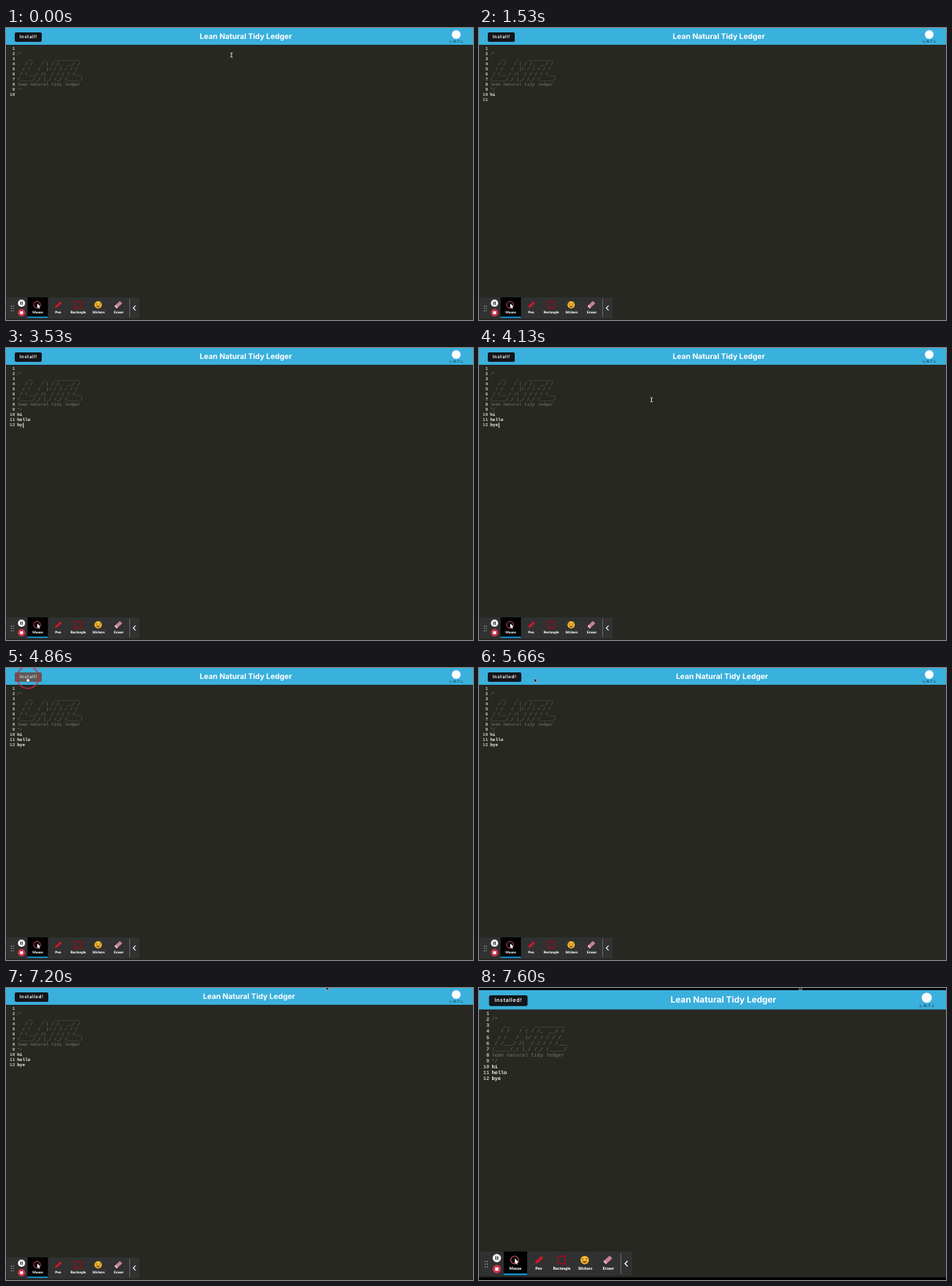
An HTML page for the animation above (8 s loop, 640 px wide and 400 px high).

```html
<!DOCTYPE html>
<html lang="en">
<head>
<meta charset="utf-8">
<title>Text editor demo</title>
<style>
  html, body { margin: 0; width: 100%; height: 100%; overflow: hidden; background: #000; }
  #stage { position: relative; width: 640px; height: 400px; overflow: hidden; background: #000; text-rendering: geometricPrecision; }

  #page { --zoom: 1; position: absolute; left: 0; top: 0; width: 640px; height: 400px; overflow: hidden; background: #272822; transform-origin: 0 0; transform: scale(var(--zoom)); }
  #page.zoomed { --zoom: 1.147; top: 3px; width: calc(640px / 1.147); height: calc(393px / 1.147); }

  header { box-sizing: border-box; position: absolute; left: 0; right: 0; top: 0; height: 23px; padding: 1px 13px 0 12px; display: flex; justify-content: space-between; align-items: center; background: #3ab0dc; font-family: Inter, sans-serif; color: #fff; }
  #install { box-sizing: border-box; height: 13px; padding: 0 6.5px; border-radius: 2px; background: #131519; font: 600 6.3px/13px Inter, sans-serif; letter-spacing: .52px; white-space: nowrap; }
  #install.hover { background: #5c5857; color: #d8d2d2; }
  h1 { margin: 0; font-size: 10.3px; line-height: 22px; font-weight: 700; white-space: nowrap; }
  .logo { position: relative; width: 19px; height: 22px; }
  .logo i { position: absolute; left: 3px; top: 2px; width: 12px; height: 12px; border-radius: 50%; background: #fff; }
  .logo b { position: absolute; left: 0; right: 0; top: 16px; text-align: center; font: 600 4.5px/6px Inter, sans-serif; letter-spacing: .35px; color: #173c4c; white-space: nowrap; }

  pre { position: absolute; top: 26.3px; margin: 0; font: 6.03px/6.95px "Liberation Mono", "Courier New", monospace; }
  #gutter { left: 0; width: 12.3px; text-align: right; color: #c8c8c4; font-weight: 700; }
  #code { left: 15.2px; color: #7d7b72; }
  #typed { color: #f8f8f2; font-weight: 700; }
  #caret { position: absolute; left: 15.7px; top: 26.3px; width: .6px; height: 6.5px; background: #f8f8f0; }

  #tools { position: absolute; left: 1px; bottom: 2px; }
  #tools text { font: 900 4.7px Lato, sans-serif; fill: #fff; text-anchor: middle; }
  #mouse { position: absolute; left: 0; top: 0; width: 640px; height: 400px; }
</style>
</head>
<body>
<div id="stage">
  <div id="page">
    <header>
      <div id="install">Install!</div>
      <h1>Lean Natural Tidy Ledger</h1>
      <div class="logo"><i></i><b>L.N.T.L</b></div>
    </header>
    <pre id="gutter"></pre>
    <pre id="code">

/*
    __    _   __________
   / /   / | / /_  __/ /
  / /   /  |/ / / / / /
 / /___/ /|  / / / / /___
/_____/_/ |_/ /_/ /_____/
lean natural tidy ledger
*/
<span id="typed"></span></pre>
    <div id="caret"></div>

    <svg id="tools" width="182" height="29" viewBox="1 369 182 29">
      <rect x="1" y="369" width="182" height="29" rx="1.5" fill="#313131"/>
      <rect x="29.5" y="369" width="28" height="28.2" fill="#000"/>
      <rect x="29.5" y="395.4" width="28" height="1.8" fill="#109ee6"/>
      <path d="M7.4 381v8M10 381v8" stroke="#b8b8b8" stroke-width="1.3" stroke-linecap="round" stroke-dasharray="0 3.2"/>
      <circle cx="21.3" cy="377" r="5" fill="#f2f2f2"/>
      <path d="M20.2 374.8v4.4M22.4 374.8v4.4" stroke="#222" stroke-width="1.1"/>
      <circle cx="21.3" cy="390" r="5" fill="#d8324c"/>
      <rect x="19.3" y="388" width="4" height="4" rx=".4" fill="#fff"/>

      <circle cx="42.6" cy="379.2" r="4.6" fill="none" stroke="#d9566c" stroke-width="1"/>
      <path d="M42.8 377.2v6.6l1.5-1.3 1 2.2 1-.5-1-2.1h2z" fill="#fff"/>
      <g transform="translate(71.5 379.5) rotate(48)" fill="#dc142c">
        <rect x="-1.8" y="-5.6" width="3.6" height="3.2" rx="1"/>
        <path d="M-1.8-1.9h3.6L1.5 2.6 0 6.2-1.5 2.6z"/>
      </g>
      <rect x="94.3" y="374.7" width="9" height="9" fill="none" stroke="#b8001a" stroke-width="1.1"/>
      <circle cx="126.3" cy="379.3" r="5" fill="#f5bb30"/>
      <path d="M123 377.4l2 .8-2 .6M129.6 377.4l-2 .8 2 .6" fill="none" stroke="#85541a" stroke-width=".7"/>
      <path d="M123.8 380.4h5a2.5 2.3 0 0 1-5 0z" fill="#8f4a18"/>
      <g transform="translate(153.8 379.2) rotate(48)">
        <rect x="-2.3" y="-5.3" width="4.6" height="10.4" rx="1" fill="#c98292"/>
        <rect x="-2.3" y="2.8" width="4.6" height="2.3" rx="1" fill="#e2b3bd"/>
      </g>
      <text x="43.5" y="391.3">Mouse</text>
      <text x="71.3" y="391.3">Pen</text>
      <text x="99" y="391.3">Rectangle</text>
      <text x="127" y="391.3">Stickers</text>
      <text x="154.7" y="391.3">Eraser</text>
      <path d="M169.5 371v25" stroke="#777" stroke-width=".8"/>
      <path d="M177.6 380.4l-3.2 3.2 3.2 3.2" fill="none" stroke="#fff" stroke-width="1.2"/>
    </svg>
  </div>

  <svg id="mouse" viewBox="0 0 640 400">
    <circle id="ring" cx="30" cy="13" r="15" fill="none" stroke="#c9283f" stroke-width="1.4"/>
    <g id="pointer">
      <path id="beam" d="M-1.6-3Q0-3 0-2Q0-3 1.6-3M0-2V2M-1.6 3Q0 3 0 2Q0 3 1.6 3" fill="none" stroke="#e4e4e4" stroke-width="1"/>
      <path id="arrow" d="M-1.2-2.8v6l1.5-1.2.9 1.8 1-.5-.9-1.7h1.8z" fill="#111" stroke="#dfe9ee" stroke-width=".5"/>
      <path id="hand" d="M-1.1 3.6L-2.7.9Q-2.6 0-1.4.8V-2.8Q-.8-3.8-.2-2.8V-.6Q2.6-.5 2.6.9L2 3.6z" fill="#fff" stroke="#222" stroke-width=".5"/>
    </g>
  </svg>
</div>
<script>
const LOOP = 8000, BLINK = 530;
const CHAR = 3.618, LINE = 6.95, FIRST_LINE = 9;
const PRESS = 4660, RELEASE = 5000, ZOOM = 7530;
const $ = id => document.getElementById(id);
const show = (id, on) => { $(id).style.display = on ? '' : 'none'; };
const within = (t, a, b) => t >= a && t < b;

const text = 'hi\nhello\nbye';
const keyTimes = [260, 600, 1000, 1800, 1930, 2060, 2130, 2260, 2660, 3260, 3460, 3660];

// time, x, y
const path = [
  [0, 309, 37], [3800, 309, 37], [4130, 237, 71], [4400, 92, 40], [4600, 30, 15.5],
  [5600, 30, 15.5], [5860, 230, 20], [6200, 506, 3], [7000, 506, 3], [7200, 440, 0]
];

function mouseAt(t) {
  let i = 0;
  while (i < path.length - 2 && t >= path[i + 1][0]) i++;
  const [t0, x0, y0] = path[i], [t1, x1, y1] = path[i + 1];
  const k = Math.min(1, (t - t0) / (t1 - t0));
  return [x0 + (x1 - x0) * k, y0 + (y1 - y0) * k];
}

function drawEditor(t) {
  const count = keyTimes.filter(k => k <= t).length;
  const rows = text.slice(0, count).split('\n');
  $('typed').textContent = rows.join('\n');
  $('gutter').textContent = Array.from({ length: FIRST_LINE + rows.length }, (_, i) => i + 1).join('\n');

  const idle = count ? t - keyTimes[count - 1] : 0;
  const col = rows[rows.length - 1].length;
  const row = FIRST_LINE + rows.length - 1;
  show('caret', count && t < PRESS && idle % (2 * BLINK) < BLINK);
  $('caret').style.transform = `translate(${col * CHAR}px, ${row * LINE}px)`;
}

function drawMouse(t) {
  const [x, y] = mouseAt(t);
  const onButton = x > 11 && x < 58 && y > 5 && y < 19;
  const inHeader = y < 23;
  $('pointer').setAttribute('transform', `translate(${x} ${y})`);
  show('pointer', !within(t, keyTimes[0], 3800));
  show('beam', !inHeader);
  show('arrow', inHeader && !onButton);
  show('hand', onButton);
  show('ring', within(t, PRESS, RELEASE));
  $('install').classList.toggle('hover', onButton);
}

function frame(now) {
  const t = now % LOOP;
  $('install').textContent = t < RELEASE ? 'Install!' : 'Installed!';
  $('page').classList.toggle('zoomed', t >= ZOOM);
  drawEditor(t);
  drawMouse(t);
  requestAnimationFrame(frame);
}
frame(performance.now());
</script>
</body>
</html>
```
